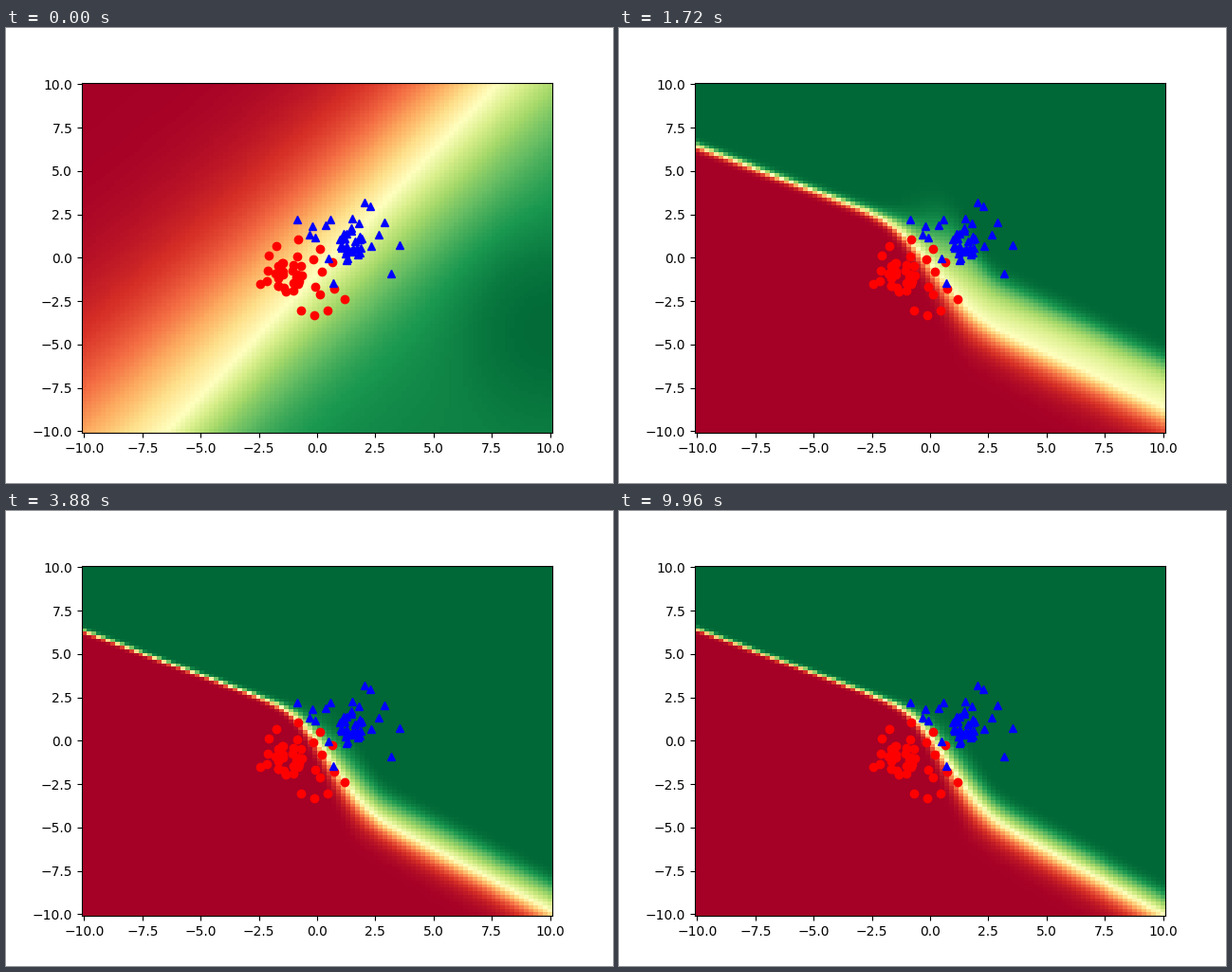
Animation, 640 px wide and 480 px high, one loop 10000 ms. Source, as a matplotlib script:

```python
import numpy as np
import matplotlib.pyplot as plt
from matplotlib.animation import FuncAnimation

STEP_MS, FRAMES = 40, 250
EDGE = 10.101

axis = np.linspace(-10, 10, 100)
X, Y = np.meshgrid(axis, axis)

# Boundary: height at the left end, three slopes, two bends.
# Blur: left width, right width above and below, reach of the upper plateau.
SLANTED = (0.6, 0.37, 0.5, 0.58, -1, 2), (1.3, 1.15, 2.4, 6)
WIDE = (6.4, 0.51, 1.7, 0.63, -1.35, 1.9), (0.1, 3, 0.65, 2.3)
LOWER = (6.0, 0.51, 2.0, 0.61, -1.15, 1.54), (0.06, 1.9, 0.5, 2.9)
FINAL = (6.4, 0.5, 2.2, 0.74, -0.55, 2.1), (0.055, 0.55, 0.45, 1.3)

# start and end in ms, states, strength of the ease-out
PHASES = [
    (400, 1720, SLANTED, WIDE, 3),
    (1720, 2400, WIDE, LOWER, 1),
    (2400, 9960, LOWER, FINAL, 6),
]


def sigmoid(v):
    return 1 / (1 + np.exp(-np.clip(v, -30, 30)))


def mix(a, b, p):
    return (1 - p) * np.asarray(a) + p * np.asarray(b)


def hinge(x, soft=0.45):
    return soft * np.logaddexp(0, x / soft)


def first_logits():
    """Untrained field: green to the lower right."""
    u = X - 0.709 * Y - 0.65
    green = 2.9 * np.tanh((0.4 - 0.006 * Y) * u / 2.9)
    green += 2 * np.exp(-((X - 10) / 3) ** 2 - ((Y + 4) / 4) ** 2)
    return np.where(u > 0, green, (0.31 + 0.006 * Y) * u)


def trained_logits(t):
    start, end, a, b, power = next(p for p in PHASES if t <= p[1])
    p = 1 - (1 - max(0, (t - start) / (end - start))) ** power
    height, m1, m2, m3, x1, x2 = mix(a[0], b[0], p)
    left, above, below, reach = np.exp(mix(np.log(a[1]), np.log(b[1]), p))

    line = (height - m1 * (axis + 10) - (m2 - m1) * hinge(axis - x1)
            + (m2 - m3) * hinge(axis - x2))
    d = (Y - line) / np.hypot(1, np.gradient(line, axis))
    side = sigmoid(axis / 1.2)
    up = left * (above / left) ** side
    down = left * (below / left) ** side
    return np.where(d > 0, d / up + (d / reach) ** 4, d / down)


START = first_logits()


def field(n):
    t = n * STEP_MS
    return sigmoid(mix(START, trained_logits(t), min(1, t / PHASES[0][0])))


def cluster(rng, center, radii, count, strays):
    """Points spread evenly over an ellipse, plus the stray ones around it."""
    angle = rng.uniform(0, 2 * np.pi, count)
    r = np.sqrt(rng.uniform(0, 1, count))
    core = np.column_stack([np.cos(angle) * r, np.sin(angle) * r])
    return np.vstack([core * radii + center, strays])


rng = np.random.default_rng(4)
red = cluster(rng, (-1.15, -0.9), (0.68, 1.15), 28, [
    (-2.44, -1.51), (-2.16, -1.34), (-2.12, -0.74), (-2.08, 0.13),
    (-1.75, 0.68), (-0.81, 1.06), (0.12, 0.51), (-0.16, -0.09),
    (0.2, -0.8), (-0.08, -1.67), (0.12, -2.11), (0.65, -0.25),
    (0.73, -1.78), (1.18, -2.38), (0.45, -3.04), (-0.12, -3.31),
    (-0.69, -3.04)])
blue = cluster(rng, (1.42, 0.7), (0.62, 1.05), 28, [
    (-0.86, 2.21), (-0.2, 1.83), (-0.33, 1.33), (-0.08, 1.17),
    (0.37, 1.88), (0.57, 2.21), (1.51, 2.26), (2.04, 3.19),
    (2.28, 2.97), (2.89, 2.04), (2.65, 1.33), (2.32, 0.68),
    (3.54, 0.73), (3.18, -0.91), (1.79, 1.99), (0.49, -0.03),
    (0.69, -1.45)])

fig, ax = plt.subplots(figsize=(6.4, 4.8), dpi=100)
image = ax.imshow(field(0), cmap="RdYlGn", vmin=0, vmax=1, origin="lower",
                  extent=(-EDGE, EDGE, -EDGE, EDGE), aspect="auto",
                  interpolation="nearest")
ax.plot(*red.T, "ro")
ax.plot(*blue.T, "b^")
ax.set_xlim(-EDGE, EDGE)
ax.set_ylim(-EDGE, EDGE)


def update(n):
    image.set_data(field(n))
    return (image,)


anim = FuncAnimation(fig, update, frames=FRAMES, interval=STEP_MS,
                     repeat=True, repeat_delay=0, blit=False)
plt.show()
```
